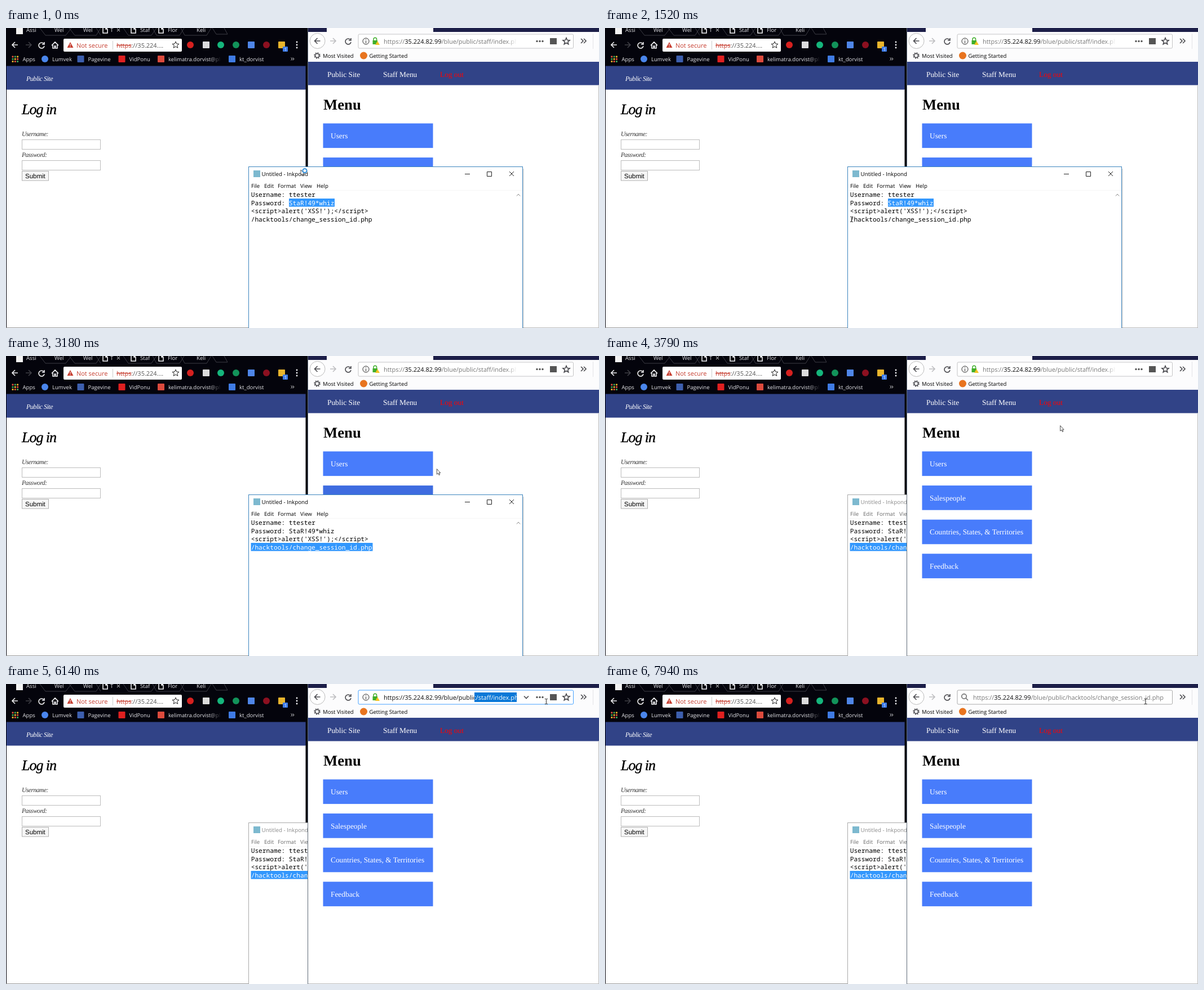
An HTML page that plays this animation: 1052x533 px, repeating every 8 s.

```html
<!DOCTYPE html>
<html lang="en">
<head>
<meta charset="utf-8">
<title>Session demo</title>
<style>
  html, body { margin: 0; height: 100%; overflow: hidden; background: #fff; }
  svg { display: block; }
  #stage { width: 100vw; height: 100vh; }
  text { font: 9.6px "Open Sans", "Noto Sans", sans-serif; white-space: pre; text-rendering: geometricPrecision; }
  .url { font-size: 10.96px; }
  .serif { font: 13.36px "Liberation Serif", serif; fill: #fff; }
  .script { font: italic 11.5px "Liberation Serif", serif; letter-spacing: -.04em; }
  .mono { font: 11.2px "Noto Sans Mono", "DejaVu Sans Mono", monospace; }
  .light { fill: #e4e4e8; }
  .dim { fill: #77777c; }
  .line { fill: none; stroke: #4a4a4f; stroke-width: 1.6; }
  .white { stroke: #f0f0f2; }
  .thin { fill: none; stroke: #222; stroke-width: 1; }
  .inactive .chrome { fill: #8a8a8a; }
  .inactive .menu .chrome { fill: #6a6a6a; }
  .inactive .frame { stroke: #aaa; }
</style>
</head>
<body>
<svg id="stage" viewBox="0 0 1052 533" preserveAspectRatio="none">
  <defs>
    <linearGradient id="toBlack"><stop stop-color="#04040c" stop-opacity="0"/><stop offset="1" stop-color="#04040c"/></linearGradient>
    <linearGradient id="toWhite"><stop stop-color="#fff" stop-opacity="0"/><stop offset="1" stop-color="#fff"/></linearGradient>
    <clipPath id="leftHalf"><rect width="535" height="533"/></clipPath>
    <clipPath id="urlClip"><rect x="652.5" y="11" width="331" height="25"/></clipPath>
    <clipPath id="addressClip"><rect x="665" y="11" width="241" height="25"/></clipPath>
    <clipPath id="selectionClip"><rect id="selection" x="831" y="15" width="0" height="17"/></clipPath>
    <path id="arrowLeft" d="M5 0H-5M0-5L-5 0 0 5"/>
    <path id="reload" d="M3.8-3.4A5 5 0 1 0 5 1M5-6V-2H1"/>
    <path id="star" d="M0-6L1.7-2 6-1.7 2.7 1.1 3.8 5.3 0 3-3.8 5.3-2.7 1.1-6-1.7-1.7-2Z"/>
    <path id="more" d="M-4-4L0 0-4 4M1-4L5 0 1 4"/>
    <path id="sheet" d="M-4-5H1L4-2V5H-4ZM1-5V-2H4"/>
    <g id="magnifier" fill="none" stroke="#666" stroke-width="1.5"><circle cx="-1" cy="-1" r="4.2"/><path d="M2 2L6 6"/></g>
  </defs>

  <!-- left browser -->
  <rect width="535" height="533" fill="#04040c"/>
  <rect x="1" y="109" width="530.5" height="424" fill="#fff"/>
  <rect x="1" y="67.5" width="530.5" height="42" fill="#314387"/>
  <path d="M60 0L70 13H106L116 0M112 0L122 13H160L168 0M160 0L168 13M208 0L217 13H258L267 0M260 0L267 13H308L316 0M310 0L317 13H356L364 0M366 0L373 11H393L387 0" fill="none" stroke="#3c3c44"/>
  <g class="tabs"></g>
  <rect x="18" y="-2" width="12" height="13" fill="#f2f2f2"/>
  <g class="line white">
    <use href="#sheet" x="176" y="4"/><use href="#sheet" x="226" y="4"/><use href="#sheet" x="275" y="4"/>
    <path d="M197 1L202 6M202 1L197 6" stroke-width="1"/>
    <use href="#arrowLeft" x="16" y="30"/>
    <use href="#arrowLeft" transform="translate(40 30) scale(-1 1)" opacity=".25"/>
    <use href="#reload" x="63" y="31"/>
    <path d="M81 31L87 25 93 31M83 30V36H86V32H88V36H91V30"/>
  </g>
  <rect x="102" y="19" width="210" height="23" rx="2" fill="#fff"/>
  <path d="M114 25L119.5 35H108.5Z" fill="#c63d2f"/><path d="M114 28V31.5M114 32.5V34" stroke="#fff"/>
  <text class="url" x="125" y="34.5" fill="#c63d2f">Not secure</text>
  <path d="M189.5 23V38" stroke="#ccc"/>
  <text class="url" x="196" y="34.5" fill="#555"><tspan fill="#c63d2f" text-decoration="line-through">https</tspan>://35.224....</text>
  <use href="#star" x="301" y="30" class="thin"/>
  <g class="marks"></g>
  <rect x="491" y="33" width="9" height="9" rx="1" fill="#3d7be8"/><text x="493.5" y="40.5" fill="#fff" style="font-size:8px">1</text>
  <g fill="#f0f0f2"><circle cx="516" cy="25" r="1.4"/><circle cx="516" cy="30" r="1.4"/><circle cx="516" cy="35" r="1.4"/></g>
  <g class="apps"></g>
  <g class="bookmarks"></g>
  <rect x="360" y="45" width="22" height="20" fill="url(#toBlack)"/>
  <use href="#more" transform="translate(508 55) scale(.6)" class="line white"/>

  <text class="script" x="36" y="93.5" fill="#fff" style="font-size:12px">Public Site</text>
  <text class="script" x="28" y="153" stroke="#000" stroke-width=".4" style="font-size:26px">Log in</text>
  <text class="script" x="28" y="192" fill="#333">Username:</text>
  <text class="script" x="28" y="229" fill="#333">Password:</text>
  <g fill="#fff" stroke="#bcbcbc"><rect x="28.5" y="198.5" width="139" height="17"/><rect x="28.5" y="235.5" width="139" height="17"/></g>
  <rect x="28.5" y="254.5" width="47" height="16.5" fill="#f6f6f6" stroke="#b0b0b0"/>
  <text x="34" y="266.5" style="font:11.5px 'Liberation Sans',sans-serif">Submit</text>
  <path d="M0 532.5H535" stroke="#999"/>

  <!-- right browser -->
  <rect x="535" width="517" height="533" fill="#fff"/>
  <rect x="535" width="517" height="7" fill="#1c1e48"/>
  <rect x="535" y="7" width="517" height="53" fill="#fcfcfd"/><rect x="569" width="189" height="8" fill="#fcfcfd"/>
  <rect x="535" y="60" width="517" height="41.5" fill="#314387"/>
  <g class="line">
    <circle cx="552.5" cy="23" r="13.5" fill="#fff" stroke="#bbb" stroke-width="1"/>
    <use href="#arrowLeft" x="552.5" y="23"/>
    <use href="#arrowLeft" transform="translate(580 23) scale(-1 1)" opacity=".35"/>
    <use href="#reload" x="607" y="24"/><use href="#more" x="1024" y="23"/>
    <circle cx="552" cy="49" r="3.5"/><circle cx="552" cy="49" r="5" stroke-dasharray="1.96"/>
    <path d="M1041.5 10V37" stroke="#e4e4e6" stroke-width="1"/>
  </g>
  <text x="562" y="53">Most Visited</text>
  <circle cx="634.5" cy="49" r="6.5" fill="#e8741f"/><text x="644.5" y="53">Getting Started</text>
  <rect id="field" x="625" y="11" width="381.5" height="25" rx="2" fill="#fff" stroke="#c4c4c6"/>
  <g id="page">
    <circle cx="638.5" cy="23.5" r="5.5" class="thin"/><path d="M638.5 20V21.3M638.5 22.7V27" stroke="#555" stroke-width="1.3"/>
    <path d="M652 22V20A2.8 2.8 0 0 1 657.6 20V22" fill="none" stroke="#3fae2a" stroke-width="1.5"/>
    <rect x="650.5" y="22" width="8.5" height="7" fill="#3fae2a"/><path d="M659 23L663 30H655Z" fill="#f3c224"/>
    <g clip-path="url(#addressClip)">
      <text class="url" id="address" x="670" y="27.5" fill="#777">https://<tspan fill="#0c0c0d">35.224.82.99</tspan>/blue/public/staff/index.php</text>
      <g clip-path="url(#selectionClip)"><rect x="831" y="15" width="80" height="17" fill="#0a78d7"/><text class="url" x="670" y="27.5" fill="#fff">https://35.224.82.99/blue/public/staff/index.php</text></g>
      <rect id="fade" x="888" y="12" width="18" height="23" fill="url(#toWhite)"/>
    </g>
    <path id="chevron" class="line" d="M919 21.5L923 25.5 927 21.5"/>
    <g fill="#555"><circle cx="942" cy="23.5" r="1.7"/><circle cx="947" cy="23.5" r="1.7"/><circle cx="952" cy="23.5" r="1.7"/><rect x="965" y="18" width="12" height="11"/></g>
    <use href="#star" x="994" y="23.5" class="line"/>
  </g>
  <g id="typed">
    <use href="#magnifier" x="638" y="23"/>
    <g clip-path="url(#urlClip)"><text class="url" x="981" y="27.5" text-anchor="end">https://35.224.82.99/blue/public/hacktools/change_session_id.php</text></g>
    <path id="urlCaret" d="M981.5 15V32" stroke="#000"/>
    <use href="#arrowLeft" class="line" transform="translate(994 23) scale(-1 1)"/>
  </g>
  <g id="sent">
    <use href="#magnifier" x="638" y="23"/>
    <text class="url" x="653" y="27.5" fill="#777">https://<tspan fill="#0c0c0d">35.224.82.99</tspan>/blue/public/hacktools/change_session_id.php</text>
  </g>
  <text class="serif" x="570" y="87">Public Site</text>
  <text class="serif" x="669" y="87">Staff Menu</text>
  <text class="serif" x="770" y="87" style="fill:#f00">Log out</text>
  <text class="serif" x="563" y="145" style="font-size:26.7px;font-weight:bold;fill:#000">Menu</text>
  <g class="tiles"></g>
  <g id="dropdown">
    <rect x="536" y="41" width="516" height="84" fill="#f8f8f9"/>
    <rect x="539" y="44.5" width="513" height="24.5" fill="#3399fb"/>
    <circle cx="640" cy="58" r="6.3" fill="#666" stroke="#eee" stroke-width=".8"/><path d="M634 58H646M640 52Q635 58 640 64Q645 58 640 52" fill="none" stroke="#eee" stroke-width=".8"/>
    <text x="653.5" y="62" fill="#fff" style="font-size:11.2px;font-weight:600">https://35.224.82.99/blue/public/hacktools/change_sess...<tspan dx="7" style="font-size:9.6px;font-weight:400">— Visit</tspan></text>
    <text x="541" y="89" class="dim">Search for <tspan fill="#111">https://35.224.82.99/blue/public/hacktools/change_session_id.php</tspan> with:</text>
    <path d="M536 97.5H1052M1030.5 98V124" stroke="#ddd"/>
    <g class="engines"></g>
    <circle cx="1049" cy="110" r="3.5" class="line"/><circle cx="1049" cy="110" r="5" class="line" stroke-dasharray="1.96"/>
    <path d="M536 125H1052" stroke="#999" stroke-width="1.5"/>
  </g>
  <path d="M535 532.5H1052M1051.5 101V533" stroke="#bbb"/>
  <path d="M535.5 0V533" stroke="#5f6b78"/>

  <!-- text editor -->
  <g id="editor">
    <path d="M918 250V533" stroke="#000" stroke-opacity=".12" stroke-width="2"/>
    <rect class="frame" x="430.5" y="246.5" width="486" height="290" fill="#fff" stroke="#3b84bd"/>
    <rect x="439" y="253" width="12" height="12" fill="#7db9cf"/>
    <text class="chrome" x="453.5" y="263" style="font-size:9.8px">Untitled - Inkpond</text>
    <path class="thin" d="M814 259.5H823M853.5 255.5H861.5V263.5H853.5ZM893 255L901 263M901 255L893 263"/>
    <g class="menu"></g>
    <path d="M432 288.5H916" stroke="#f6f6f6"/>
    <path d="M906 298.5L909 295 912 298.5" class="thin" style="stroke:#888"/>
    <rect id="passwordMark" x="502" y="303" width="81" height="14.5" fill="#3297fd"/>
    <rect id="pathMark" x="434.5" y="332" width="216" height="14.5" fill="#3297fd"/>
    <text class="mono" x="434.7" y="300">Username: ttester</text>
    <text class="mono" x="434.7" y="314.5">Password: <tspan id="password">StaR!49*whiz</tspan></text>
    <text class="mono" x="434.7" y="329">&lt;script&gt;alert('XSS!');&lt;/script&gt;</text>
    <text class="mono" x="434.7" y="343.5" id="path">/hacktools/change_session_id.php</text>
    <path id="caret" d="M643.5 318V332" stroke="#000"/>
  </g>

  <g id="cursor">
    <g id="arrow"><path d="M0 0V9.5L2.3 7.6 3.8 11 5.3 10.3 3.8 7.1H6.5Z" fill="#fff" stroke="#222" stroke-width=".8"/><circle id="busy" cx="7" cy="1.5" r="3.6" fill="#fff" stroke="#3592dc" stroke-width="2"/></g>
    <path id="beam" d="M-2.5-4.5H-.7L0-4 .7-4.5H2.5M0-4V4M-2.5 4.5H-.7L0 4 .7 4.5H2.5" fill="none" stroke="#222"/>
  </g>
</svg>
<script>
const $ = id => document.getElementById(id);
const fill = (name, items, draw) => {
  document.querySelector('.' + name).innerHTML = items.map(draw).join('');
};
const label = (x, y, text, cls = '') => `<text class="${cls}" x="${x}" y="${y}">${text}</text>`;
const badge = (x, y, color, round, size = 12) =>
  `<rect x="${x - size / 2}" y="${y - size / 2}" width="${size}" height="${size}" rx="${round ? size / 2 : 1}" fill="${color}"/>`;

fill('tabs', [[36, 'Assi'], [86, 'Wel'], [137, 'Wel'], [185, 'T'], [238, 'Staf'], [287, 'Flor'], [338, 'Keli']],
  ([x, name]) => label(x, 7, name, 'light'));
fill('marks', [[327, '#d6201f', 1], [355, '#dcdcdc', 0], [381, '#15b67c', 1], [408, '#12935a', 1],
  [435, '#4f86e8', 0], [462, '#8c1020', 1], [489, '#e9b52c', 0]], ([x, color, round]) => badge(x, 30, color, round));
fill('apps', [...Array(9).keys()], i =>
  badge(12 + i % 3 * 4.3, 51 + Math.floor(i / 3) * 4.3, ['#e5533d', '#3fa757', '#e9b52c'][(i + Math.floor(i / 3)) % 3], 0, 3));
fill('bookmarks', [[29.5, 'Apps'], [82, 'Lumvek', '#4a86ec', 1], [145.5, 'Pagevine', '#3d5fae'], [218.5, 'VidPonu', '#e02020'],
  [288, 'kelimatra.dorvist@pl', '#dc4a3d'], [414, 'kt_dorvist', '#3f7be4']],
  ([x, name, color, round]) => label(x, 58.5, name, 'light') + (color ? badge(x - 13, 55, color, round) : ''));
fill('tiles', ['Users', 'Salespeople', 'Countries, States, &amp; Territories', 'Feedback'], (name, i) =>
  `<rect id="tile${i}" x="562.5" y="${169.5 + i * 60.6}" width="195" height="43.6" fill="#487cfb"/>` +
  label(576, 196 + i * 60.6, name, 'serif'));
fill('engines', ['#4285f4', '#15837f', '#222', '#15837f', '#de5833', '#c9302c', '#2aa3ef', '#444'], (color, i) =>
  badge(556.5 + i * 40.3, 110, color, i % 2 === 0, 11) +
  (i < 7 ? `<path d="M${576.5 + i * 40.3} 100V122" stroke="#ddd"/>` : ''));
fill('menu', [[435, 'File'], [458, 'Edit'], [482, 'Format'], [522, 'View'], [551, 'Help']],
  ([x, name]) => label(x, 284, name, 'chrome'));

// pointer waypoints: time, x, y
const route = [[0, 523, 252], [120, 523, 252], [540, 440, 347], [690, 440, 347], [1120, 433, 340], [1520, 433, 340],
  [2060, 713, 331], [2200, 713, 331], [2470, 715, 344], [2920, 715, 344], [3180, 763, 203],
  [4040, 830, 84], [4590, 831, 25], [4870, 832, 24], [5300, 832, 24], [6120, 959, 31], [8000, 959, 31]];

function pointerAt(t) {
  const i = Math.max(1, route.findIndex(p => p[0] >= t));
  const [t0, x0, y0] = route[i - 1], [t1, x1, y1] = route[i];
  const k = (t - t0) / (t1 - t0);
  return [x0 + (x1 - x0) * k, y0 + (y1 - y0) * k];
}

const show = (id, on) => { $(id).style.display = on ? '' : 'none'; };
const STEP = 139;

function render(t) {
  const sampled = Math.floor((t + 20) / STEP) * STEP;
  const [x, y] = pointerAt(Math.min(sampled, 7999));
  const raised = t >= 3600;
  const selecting = t >= 5430 && t < 6970;
  const typing = t >= 6970 && t < 7940;
  const inEditor = !raised && x > 431 && x < 917 && y > 288;
  const inField = x > 625 && x < 1007 && y > 11 && y < 36;

  $('cursor').setAttribute('transform', `translate(${x} ${y})`);
  show('beam', inEditor || inField);
  show('arrow', !inEditor && !inField);
  show('busy', t < 140);

  const passwordMarked = t < 1930, pathMarked = t >= 2330;
  show('passwordMark', passwordMarked);
  $('password').setAttribute('fill', passwordMarked ? '#fff' : '#000');
  show('pathMark', pathMarked);
  $('path').setAttribute('fill', pathMarked ? '#fff' : '#000');
  show('caret', t >= 1930 && t < 2330);

  $('editor').setAttribute('class', raised ? 'inactive' : '');
  $('editor').setAttribute('clip-path', raised ? 'url(#leftHalf)' : 'none');
  $('tile1').setAttribute('fill', t >= 3050 && t < 3330 ? '#3e6ce0' : '#487cfb');

  show('page', t < 6970);
  show('chevron', t >= 4310);
  show('fade', !selecting);
  $('address').setAttribute('fill', selecting ? '#0c0c0d' : '#777');
  $('selection').setAttribute('width', selecting ? Math.max(0, Math.min(x, 911) - 831) : 0);
  $('field').setAttribute('stroke', selecting || typing ? '#45a1ff' : inField ? '#aaa' : '#c4c4c6');
  show('typed', typing);
  show('dropdown', typing);
  show('urlCaret', t < 7530);
  show('sent', t >= 7940);
}

const start = performance.now();
function tick() {
  render((performance.now() - start) % 8000);
  requestAnimationFrame(tick);
}
tick();
</script>
</body>
</html>
```
